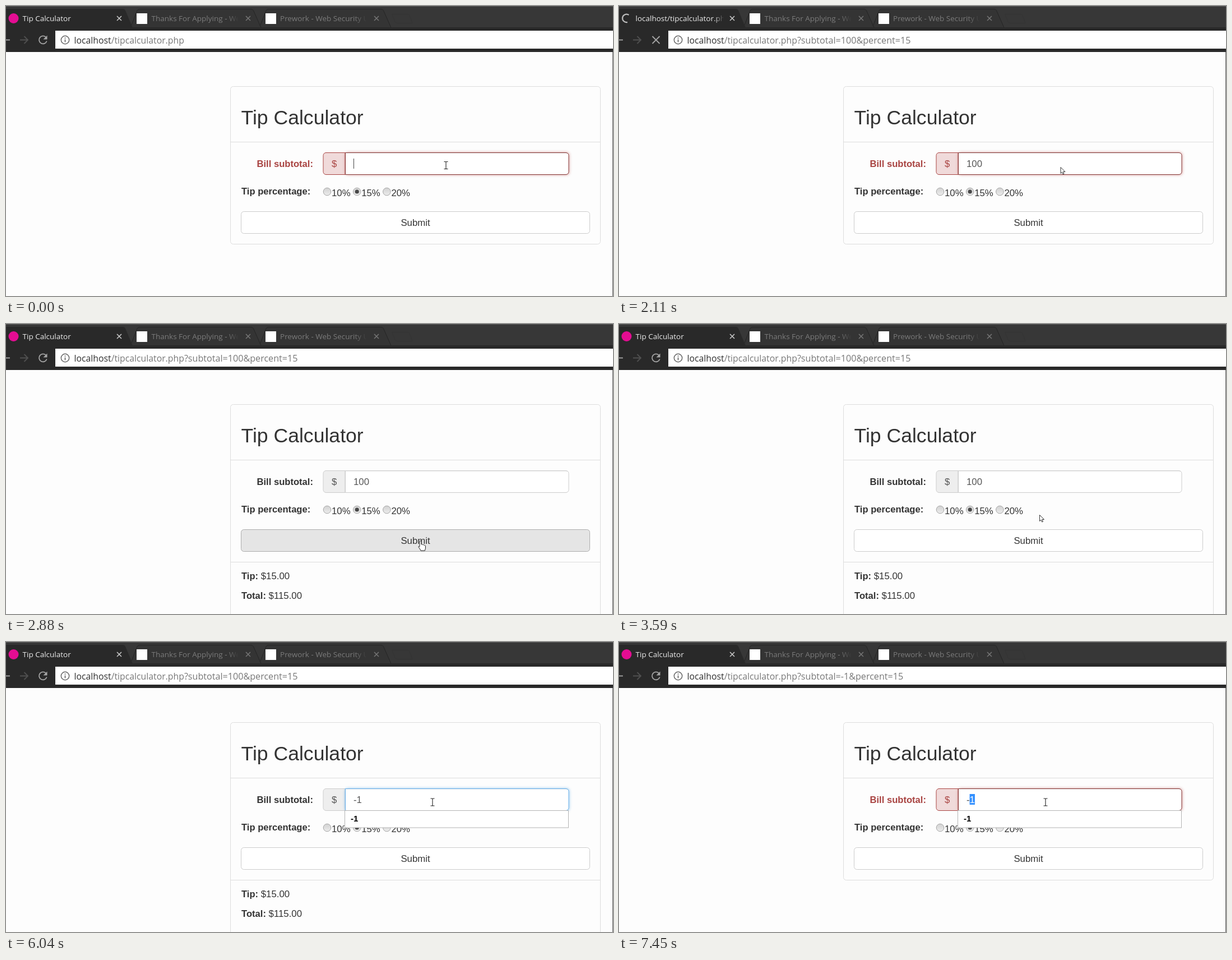
Write an HTML page that moves like this. It is 1083 px wide and 517 px high and loops after 8 s.

```html
<!DOCTYPE html>
<html lang="en">
<head>
<meta charset="utf-8">
<title>Tip Calculator</title>
<style>
  html, body { margin: 0; width: 100%; height: 100%; overflow: hidden; background: #fdfdfd; }
  svg { display: block; width: 1083px; height: 517px; }
  text { white-space: pre; }
  .ui { font-family: "Open Sans", "Noto Sans", sans-serif; font-size: 13.5px; }
  .url { font-family: "Open Sans", "Noto Sans", sans-serif; font-size: 15.8px; fill: #777; }
  .page { font-family: "Liberation Sans", Arial, sans-serif; font-size: 16.8px; fill: #333; }
  .b { font-weight: bold; font-size: 16.6px; }
  .line { fill: none; stroke: #ddd; }
  .icon { fill: none; stroke: #a5a5a5; stroke-width: 1.8; }
  .tab { fill: #343434; stroke: #252525; }
</style>
</head>
<body>
<svg viewBox="0 0 1083 517" xmlns="http://www.w3.org/2000/svg">
  <defs>
    <linearGradient id="fadeOn"><stop offset="0" stop-color="#292929" stop-opacity="0"/><stop offset="1" stop-color="#292929"/></linearGradient>
    <linearGradient id="fadeOff"><stop offset="0" stop-color="#343434" stop-opacity="0"/><stop offset="1" stop-color="#343434"/></linearGradient>
    <linearGradient id="knob" x2="0" y2="1"><stop offset="0" stop-color="#d2d2d2"/><stop offset="1" stop-color="#ececec"/></linearGradient>
    <clipPath id="clip0"><rect x="28" y="8" width="159" height="28"/></clipPath>
    <clipPath id="clip1"><rect x="258" y="8" width="156" height="28"/></clipPath>
    <clipPath id="clip2"><rect x="487" y="8" width="156" height="28"/></clipPath>
    <filter id="blur" x="-5%" y="-50%" width="110%" height="200%"><feGaussianBlur stdDeviation="2.6"/></filter>
  </defs>

  <!-- browser -->
  <rect width="1083" height="83" fill="#373737"/>
  <rect width="1083" height="1" fill="#5a5a5a"/>
  <path d="M689 14.500H716Q719 14.500 720 17L725 30.500H698Q695 30.500 694 28Z" fill="none" stroke="#333"/>
  <path class="tab" d="M452 38.500L464 8Q465.500 5.500 468 5.500H669Q672 5.500 673.500 8L687 38.500Z"/>
  <path class="tab" d="M222 38.500L234 8Q235.500 5.500 238 5.500H437Q440 5.500 441.500 8L455 38.500Z"/>
  <path d="M0 5H208Q211.500 5 213 8L226 39H0Z" fill="#292929"/>
  <rect y="38" width="1083" height="45" fill="#292929"/>
  <g class="ui" fill="#7b7b7b">
    <text id="title" x="29.500" y="27" fill="#ececec" clip-path="url(#clip0)"></text>
    <text x="259.500" y="27" clip-path="url(#clip1)">Thanks For Applying - Web</text>
    <text x="489" y="27" clip-path="url(#clip2)">Prework - Web Security Unit</text>
  </g>
  <rect x="170" y="9" width="17" height="27" fill="url(#fadeOn)"/>
  <rect x="394" y="9" width="21" height="27" fill="url(#fadeOff)"/>
  <rect x="622" y="9" width="22" height="27" fill="url(#fadeOff)"/>
  <rect x="233" y="13" width="19" height="19" fill="#fff"/>
  <rect x="463" y="13" width="19" height="19" fill="#fff"/>
  <circle id="fav" cx="13.500" cy="22" r="9" fill="#e40d92"/>
  <path id="spin" d="M17.500 16A7.200 7.200 0 1 0 15 28.900" fill="none" stroke="#bcbcbc" stroke-width="2.200"/>
  <g fill="none" stroke-width="1.600">
    <path d="M198 18l8 8m0-8l-8 8" stroke="#c8c8c8"/>
    <path d="M428 18l8 8m0-8l-8 8M657 18l8 8m0-8l-8 8" stroke="#747474"/>
  </g>
  <path class="icon" d="M0 60.500H7"/>
  <path class="icon" d="M25 60.500H39M32.500 54l6.500 6.500-6.500 6.500" style="stroke:#505050"/>
  <g id="reload"><path class="icon" d="M71.500 56A7 7 0 1 0 72.700 62.500"/><path d="M73.500 52.500V59.500H66.500Z" fill="#a5a5a5"/></g>
  <path id="stop" class="icon" d="M59.500 54l13 13m0-13l-13 13"/>
  <rect x="88" y="44" width="995" height="32" fill="#fff"/>
  <circle cx="105.500" cy="60.500" r="7.200" fill="none" stroke="#666" stroke-width="1.500"/>
  <path d="M105.500 59.500V64.500M105.500 56.300V58" stroke="#666" stroke-width="1.700"/>
  <text class="url" x="121.500" y="66.500"><tspan fill="#303030">localhost</tspan>/tipcalculator.php<tspan id="query" font-size="16.150"></tspan></text>

  <!-- page -->
  <rect y="82" width="1083" height="435" fill="#fdfdfd"/>
  <rect x="1082" y="82" width="1" height="435" fill="#606060"/>
  <rect id="panel" class="line" x="400.500" y="143.500" width="660" rx="5"/>
  <path class="line" d="M401 242.500H1060"/>
  <text class="page" x="419.500" y="211" style="font-size:35.6px">Tip Calculator</text>
  <text id="label" class="page b" x="447.500" y="287">Bill subtotal:</text>
  <text class="page b" x="420" y="336">Tip percentage:</text>
  <g id="radios"></g>
  <rect id="btn" x="419.500" y="366.500" width="622" height="39" rx="5"/>
  <text class="page" x="730.500" y="392" text-anchor="middle">Submit</text>
  <g id="result" class="page">
    <path class="line" d="M401 424.500H1060"/>
    <text x="420" y="454.500"><tspan class="b">Tip:</tspan> $15.00</text>
    <text x="420" y="490"><tspan class="b">Total:</tspan> $115.00</text>
  </g>
  <path id="addon" d="M605 261.500H571a5 5 0 0 0-5 5V295.500a5 5 0 0 0 5 5H605Z"/>
  <text id="dollar" class="page" x="581" y="287">$</text>
  <rect id="glow" x="605" y="261" width="400" height="40" rx="5" filter="url(#blur)"/>
  <path id="input" d="M605.500 261.500H999a5 5 0 0 1 5 5V295.500a5 5 0 0 1-5 5H605.500Z" fill="#fff"/>
  <path d="M606 262.500H1002" stroke="#000" stroke-opacity=".06"/>
  <rect id="mark" y="271" height="19" fill="#3390ff"/>
  <text class="page" x="620" y="286.500" style="fill:#555"><tspan id="plain"></tspan><tspan id="picked" fill="#fff"></tspan></text>
  <rect id="caret" y="272" width="1" height="18" fill="#444"/>
  <g id="list">
    <rect id="box" x="604.500" y="300.500" width="399" fill="#fff" stroke="#b4b4b4"/>
    <text id="item0" class="page b" x="615" y="320" style="font-size:15px;fill:#000"></text>
    <text id="item1" class="page b" x="615" y="349" style="font-size:15px;fill:#000"></text>
  </g>

  <!-- pointers, drawn around their hot spot -->
  <path id="beam" d="M-3.500-6.500H-1Q0-6.500 0-5.500Q0-6.500 1-6.500H3.500M0-5.500V5.500M-3.500 6.500H-1Q0 6.500 0 5.500Q0 6.500 1 6.500H3.500" fill="none" stroke="#222" stroke-width="1.100"/>
  <path id="arrow" d="M.5.500V11.500L3 9.200L4.700 13L6.500 12.200L4.900 8.500H8.500Z" fill="#fff" stroke="#333"/>
  <path id="hand" d="M-1 11V2Q-1 .500 .500 .500T2 2V7Q4 6 4.800 7.700Q6.600 7 7.300 8.600Q9 8 9.500 9.700V13Q9.500 15 8.300 18H1Q0 15.500-3 11.500Q-3.500 9.500-1 11Z" fill="#fff" stroke="#222"/>
</svg>
<script>
const LOOP = 8000;
const $ = id => document.getElementById(id);
const set = (id, attrs) => { for (const k in attrs) $(id).setAttribute(k, attrs[k]); };
const show = (id, on) => { $(id).style.display = on ? '' : 'none'; };
const textWidth = s => [...s].reduce((w, c) => w + (c === '-' ? 5.6 : 9.34), 0);

$('radios').innerHTML = ['10%', '15%', '20%'].map((label, i) => {
  const x = 573 + 53.2 * i;
  const dot = i === 1 ? `<circle cx="${x}" cy="331" r="3.600" fill="#484848"/>` : '';
  return `<circle cx="${x}" cy="331" r="6.800" fill="url(#knob)" stroke="#a6a6a6"/>${dot}
    <text class="page" x="${x + 8}" y="338.500">${label}</text>`;
}).join('');

const start = {
  query: '', loading: false, error: true, focus: true, result: false, hover: false,
  value: '', selected: 0, caret: true, list: [], pointer: ['beam', 785, 284]
};

// each step changes part of the state from its time on
const steps = [
  [130, { value: '1', list: ['100', '1'] }],
  [340, { value: '10', list: ['100'] }],
  [470, { value: '100' }],
  [1060, { caret: false }],
  [1183, { list: [], loading: true, query: '100' }],
  [2110, { pointer: ['arrow', 787.5, 287] }],
  [2237, { error: false, focus: false, result: true, pointer: ['arrow', 782, 298] }],
  [2363, { loading: false, pointer: ['arrow', 770, 316] }],
  [2490, { pointer: ['arrow', 757, 338] }],
  [2630, { hover: true, pointer: ['hand', 745, 372] }],
  [2760, { pointer: ['hand', 739, 384] }],
  [2880, { pointer: ['hand', 739, 386] }],
  [3470, { pointer: ['hand', 742, 376] }],
  [3590, { hover: false, pointer: ['arrow', 750, 340] }],
  [3710, { pointer: ['arrow', 757, 313] }],
  [3850, { pointer: ['beam', 764, 297] }],
  [3980, { pointer: ['beam', 761, 285.5] }],
  [4250, { focus: true, caret: true }],
  [4370, { list: ['100'] }],
  [4530, { selected: 3, caret: false }],
  [4930, { value: '', selected: 0, list: [], caret: true }],
  [5360, { value: '-', list: ['-1'] }],
  [5640, { value: '-1' }],
  [6040, { caret: false }],
  [6180, { list: [], loading: true, query: '-1' }],
  [6450, { error: true, focus: false, result: false }],
  [6570, { loading: false }],
  [7290, { selected: 1 }],
  [7450, { focus: true, list: ['-1'] }]
];

function stateAt(t) {
  return Object.assign({}, start, ...steps.filter(s => s[0] <= t).map(s => s[1]));
}

function draw(t) {
  const s = stateAt(t);

  $('title').textContent = s.loading ? 'localhost/tipcalculator.php' : 'Tip Calculator';
  $('query').textContent = s.query && `?subtotal=${s.query}&percent=15`;
  show('fav', !s.loading);
  show('spin', s.loading);
  show('reload', !s.loading);
  show('stop', s.loading);
  set('spin', { transform: `rotate(${-35 * Math.floor((t - 2110) / 130)} 13 22)` });

  const border = s.error ? (s.focus ? '#843534' : '#a94442') : (s.focus ? '#66afe9' : '#ccc');
  $('label').style.fill = s.error ? '#a94442' : '#333';
  $('dollar').style.fill = s.error ? '#a94442' : '#555';
  set('addon', { fill: s.error ? '#f0dada' : '#eee', stroke: s.error ? '#a94442' : '#ccc' });
  set('input', { stroke: border });
  set('glow', { fill: s.error ? '#ce8483' : '#66afe9', opacity: s.error ? 0.8 : 0.7 });
  show('glow', s.focus);
  set('panel', { height: s.result ? 400 : 281 });
  show('result', s.result);
  set('btn', { fill: s.hover ? '#e5e5e5' : '#fff', stroke: s.hover ? '#adadad' : '#ccc' });

  const cut = s.value.length - s.selected;
  const plain = s.value.slice(0, cut), picked = s.value.slice(cut);
  $('plain').textContent = plain;
  $('picked').textContent = picked;
  set('mark', { x: 620 + textWidth(plain), width: textWidth(picked) });
  set('caret', { x: 620 + textWidth(s.value) });
  show('caret', s.focus && s.caret);

  show('list', s.list.length);
  set('box', { height: 1 + 29.5 * s.list.length });
  [0, 1].forEach(i => { $('item' + i).textContent = s.list[i] || ''; });

  const [kind, x, y] = s.pointer;
  ['beam', 'arrow', 'hand'].forEach(id => show(id, id === kind));
  set(kind, { transform: `translate(${x} ${y})` });
}

const began = performance.now();
function tick() {
  draw((performance.now() - began) % LOOP);
  requestAnimationFrame(tick);
}
tick();
</script>
</body>
</html>
```
